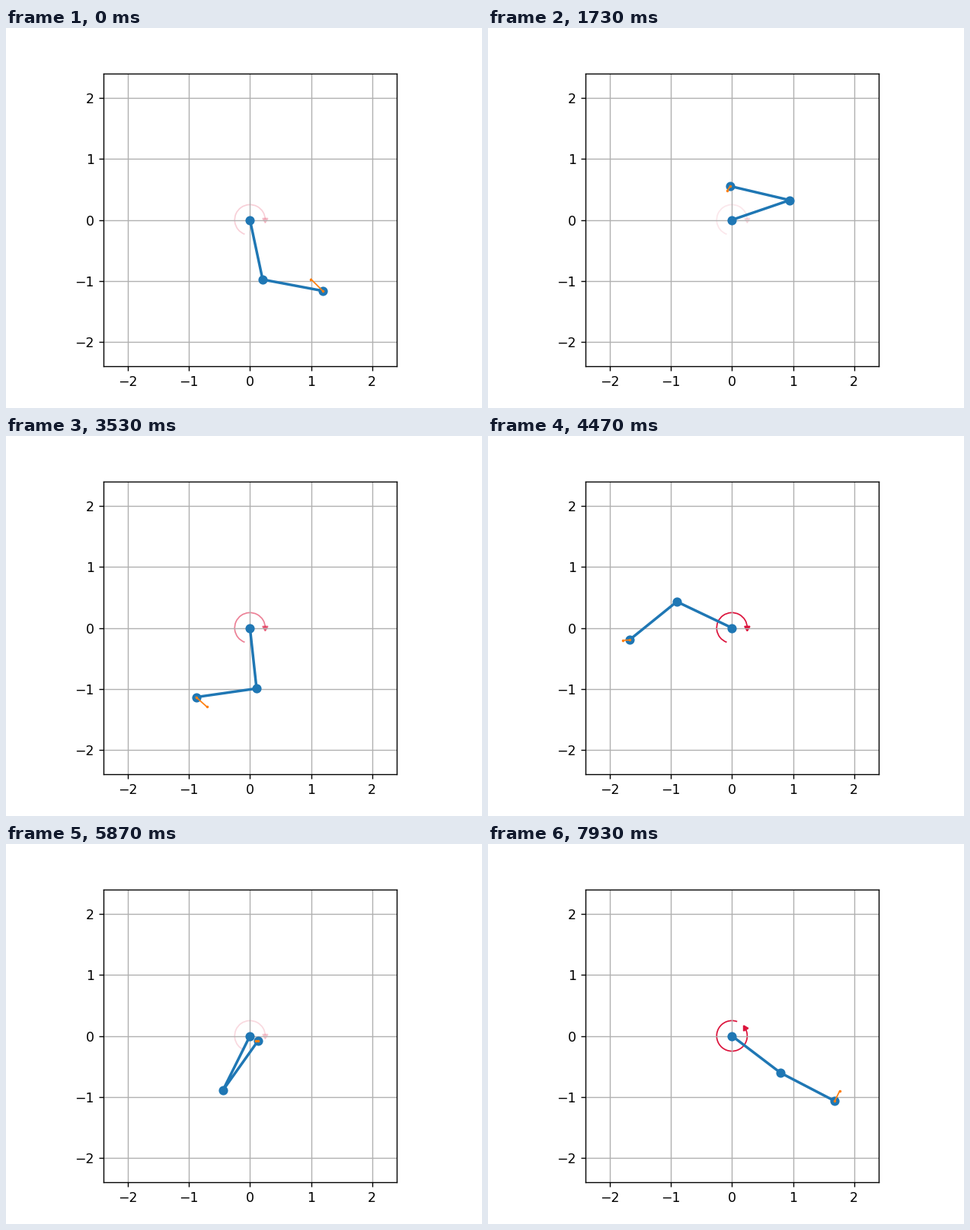
A matplotlib script that plays this animation: 625x500 px, repeating every 8 s.

```python
import numpy as np
import matplotlib.pyplot as plt
from matplotlib.animation import FuncAnimation
from matplotlib.patches import Arc, RegularPolygon

LOOP_MS = 8000
INTERVAL_MS = 50
TICK_MS = 8000 / 120

# The simulation runs a little slower than the screen, at an uneven pace;
# its signed torque drifts between the same moments.
BEAT_TICKS = [0, 12, 38, 67, 88, 106, 119]
BEAT_STEPS = [0, 10, 31, 55, 74, 87, 99]
BEAT_TORQUE = [-0.2, -0.14, -0.07, -1, -0.16, 0.32, 1]

# Key poses: step, then the absolute angle of each link in degrees.
POSES = np.array([
    (0, -78, -10.7), (4, -27.6, -61.4), (10, 21.2, -118.3),
    (18, 28.8, -170), (25, -5, -231), (31, -63.4, -311.7),
    (35, -75, -375), (39, -62, -462), (42, -76, -521),
    (46, -115, -543), (50, -168, -531), (55, -205.5, -501),
    (61, -230, -460), (66, -216, -412), (74, -116.4, -305.3),
    (79, -61, -268), (87, -13.1, -292.6), (99, -37.3, -387.5),
])
KEY_STEPS, KEY_ANGLES = POSES[:, 0], np.radians(POSES[:, 1:])
KEY_RATES = np.gradient(KEY_ANGLES, KEY_STEPS, axis=0)


def link_angles(step):
    """Cubic Hermite curve through the key poses."""
    i = np.searchsorted(KEY_STEPS, step, side="right") - 1
    i = int(np.clip(i, 0, len(KEY_STEPS) - 2))
    span = KEY_STEPS[i + 1] - KEY_STEPS[i]
    u = (step - KEY_STEPS[i]) / span
    ease = u * u * (3 - 2 * u)
    return ((1 - ease) * KEY_ANGLES[i] + ease * KEY_ANGLES[i + 1]
            + span * u * (1 - u) * ((1 - u) * KEY_RATES[i]
                                    - u * KEY_RATES[i + 1]))


def joints(step):
    """x and y of pivot, elbow and tip."""
    angles = link_angles(step)
    return (np.cumsum([0, *np.cos(angles)]), np.cumsum([0, *np.sin(angles)]))


def step_at(frame):
    """Simulation step on screen when the frame ends."""
    tick = ((frame + 1) * INTERVAL_MS - 1) // TICK_MS
    return int(np.interp(tick, BEAT_TICKS, BEAT_STEPS) + 0.17)


fig = plt.figure(figsize=(5, 4), dpi=125)
ax = fig.add_subplot(xlim=(-2.4, 2.4), ylim=(-2.4, 2.4))
ax.set_aspect("equal")
ax.grid()


def turn_arrow(start, sweep, head_at):
    arc = Arc((0, 0), 0.5, 0.5, angle=start, theta1=0, theta2=sweep,
              color="crimson")
    turn = np.radians(head_at)
    head = RegularPolygon((0.25 * np.cos(turn), 0.25 * np.sin(turn)), 3,
                          radius=0.05, color="crimson",
                          orientation=np.radians(60) - turn)
    return [ax.add_patch(arc), ax.add_patch(head)]


clockwise = turn_arrow(0, 250, 0)
counter = turn_arrow(70, 320, 30)
rod, = ax.plot([], [], "o-", lw=2)
trace, = ax.plot([], [], ".-", lw=1, ms=2)


def update(frame):
    step = step_at(frame)
    x, y = joints(step)
    last_x, last_y = joints(step - 1)
    rod.set_data(x, y)
    trace.set_data([last_x[-1], x[-1]], [last_y[-1], y[-1]])

    torque = np.interp(step, BEAT_STEPS, BEAT_TORQUE)
    for patches, sign in ((clockwise, -1), (counter, 1)):
        for patch in patches:
            patch.set_visible(torque * sign > 0)
            patch.set_alpha(abs(torque))
    return rod, trace, *clockwise, *counter


anim = FuncAnimation(fig, update, frames=LOOP_MS // INTERVAL_MS,
                     interval=INTERVAL_MS, repeat=True, repeat_delay=0)
plt.show()
```
